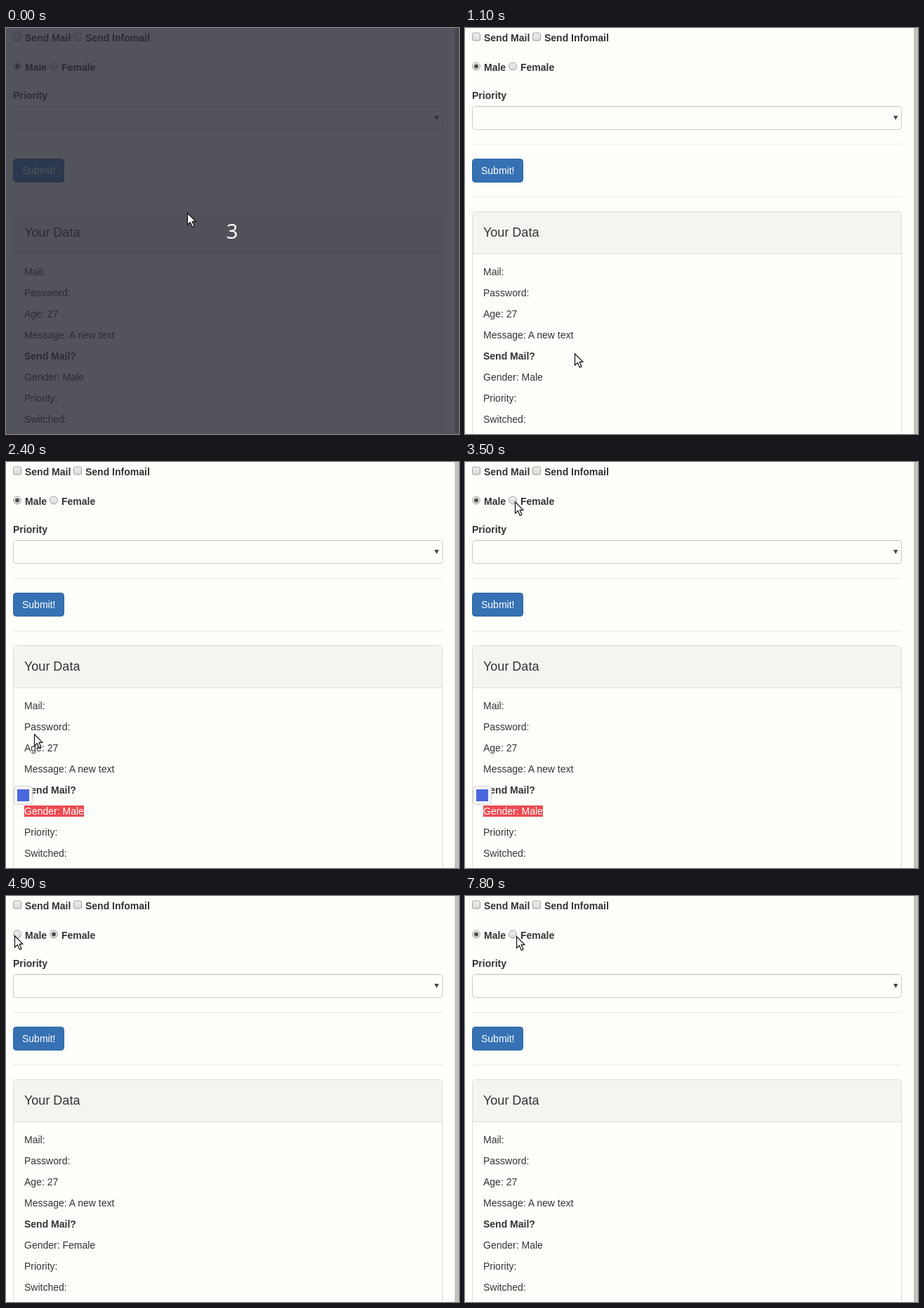
An HTML page that plays this animation: 645x578 px, repeating every 8 s.

```html
<!DOCTYPE html>
<html lang="en">
<head>
<meta charset="utf-8">
<title>Form demo</title>
<style>
  html, body { margin: 0; width: 100%; height: 100%; overflow: hidden; background: #fefffb; }
  svg { display: block; font: 14px "Liberation Sans", Arial, sans-serif; fill: #333; }
  .bold { font-weight: bold; }
  .line { stroke: #ecece9; }
  .box { fill: url(#knob); stroke: #a3a3a1; }
</style>
</head>
<body>
<svg width="645" height="578" viewBox="0 0 645 578">
  <defs>
    <linearGradient id="knob" x2="0" y2="1">
      <stop stop-color="#f0f0ee"/><stop offset="1" stop-color="#d8d8d6"/>
    </linearGradient>
    <clipPath id="selClip"><rect id="clipRect" y="489" height="16"/></clipPath>
  </defs>

  <rect class="box" x="10.5" y="7" width="11" height="11" rx="2"/>
  <rect class="box" x="96.5" y="7" width="11" height="11" rx="2"/>
  <circle class="box" cx="16" cy="54.5" r="5.5"/>
  <circle class="box" cx="68" cy="54.5" r="5.5"/>
  <circle id="dot" cy="54.5" r="3" fill="#505050"/>
  <g class="bold">
    <text x="27" y="19">Send Mail</text>
    <text x="113" y="19">Send Infomail</text>
    <text x="27" y="61">Male</text>
    <text x="79" y="61">Female</text>
    <text x="10" y="101">Priority</text>
  </g>

  <rect x="10.5" y="111.5" width="611" height="33" rx="4" fill="#fefffb" stroke="#c9c9c6"/>
  <path d="M12 112.5H620" stroke="#ecece9"/>
  <path d="M610 125h6.4l-3.2 6z" fill="#444"/>
  <path class="line" d="M10 165.5H622M10 240.5H622"/>
  <rect x="10.5" y="186.5" width="72" height="33" rx="4" fill="#3671b3" stroke="#2e66a2"/>
  <text x="23" y="208" fill="#fff">Submit!</text>

  <rect x="10.5" y="261.5" width="611" height="340" rx="4" fill="#fefffb" stroke="#dcdcd9"/>
  <path d="M11 321V265q0-3 3-3H618q3 0 3 3V321z" fill="#f4f4f1"/>
  <path d="M11 321.5H621" stroke="#dcdcd9"/>
  <text x="26" y="297" font-size="18">Your Data</text>
  <g id="rows"></g>

  <g id="selection">
    <rect id="selRect" y="489" height="16" fill="#ec4a52"/>
    <text x="26" y="502" fill="#fff" clip-path="url(#selClip)">Gender: Male</text>
  </g>
  <g id="popup">
    <rect x="11.5" y="461.5" width="26" height="26" rx="4" fill="#f5f5f3" stroke="#d2d2d0"/>
    <rect x="16" y="466" width="17" height="17" fill="#4a67e0"/>
  </g>
  <rect x="639" width="6" height="578" fill="#c0c0bd"/>

  <g id="countdown">
    <rect width="645" height="578" fill="#282a34" fill-opacity=".8"/>
    <path d="M0 577.5H645" stroke="#6b4652"/>
    <text x="322" y="300" text-anchor="middle" fill="#fff"
      style="font: 29px 'Noto Sans', 'Open Sans', sans-serif">3</text>
  </g>
  <path id="arrow" d="M.5 .8V17.2L4.3 13.6L7.3 20.2L10 19L7.1 12.6L11.8 12.2Z" fill="#fff" stroke="#111" stroke-width="1.2"/>
  <g id="beam" fill="none">
    <path d="M-3-7H3M0-7V7M-3 7H3" stroke="#fff" stroke-width="4"/>
    <path d="M-3-7H3M0-7V7M-3 7H3" stroke="#111" stroke-width="1.6"/>
  </g>
</svg>
<script>
const LOOP = 8000, STEP = 100;
const $ = id => document.getElementById(id);
const show = (id, on) => $(id).style.display = on ? "" : "none";
const place = (id, x, y) => $(id).setAttribute("transform", `translate(${x} ${y})`);

const lines = ["Mail:", "Password:", "Age: 27", "Message: A new text",
  "Send Mail?", "Gender: Male", "Priority:", "Switched:"];
const rows = lines.map((line, i) => {
  const row = document.createElementNS("http://www.w3.org/2000/svg", "text");
  row.setAttribute("x", 26);
  row.setAttribute("y", 352 + 30 * i);
  if (i === 4) row.setAttribute("class", "bold");
  row.textContent = line;
  $("rows").append(row);
  return row;
});

// Pointer moves: start, end, target x, target y
const moves = [
  [500, 800, 186, 426], [900, 1300, 126, 499], [1400, 1600, 108, 497],
  [1600, 1700, 74, 496], [1700, 2100, 24, 497], [2100, 2200, 23, 498],
  [2300, 2700, 90, 53], [2900, 3000, 82, 54], [3100, 3200, 75, 55],
  [3400, 3500, 71, 56], [4500, 4900, 12, 56], [6400, 6500, 12, 54],
  [7300, 7600, 69, 58], [7700, 7800, 73, 57]
];

function pointer(t) {
  let x = 258, y = 263;
  for (const [start, end, tx, ty] of moves) {
    const k = Math.min(1, Math.max(0, (t - start) / (end - start)));
    x += (tx - x) * k;
    y += (ty - y) * k;
  }
  return [Math.round(x), Math.round(y)];
}

function draw(t) {
  const [x, y] = pointer(t);
  const female = t >= 3800 && t < 7000;
  const dragging = t >= 1600 && t < 2400;
  const left = t < 2100 ? Math.max(26, x + 2.5) : 26;

  show("countdown", t < 500);
  show("selection", t >= 1600 && t < 3700);
  show("popup", t >= 2300 && t < 3700);
  show("arrow", !dragging);
  show("beam", dragging);
  place("arrow", x, y);
  place("beam", x, y);
  for (const id of ["selRect", "clipRect"]) {
    $(id).setAttribute("x", left);
    $(id).setAttribute("width", Math.max(0, 111 - left));
  }
  $("dot").setAttribute("cx", female ? 68 : 16);
  rows[5].textContent = "Gender: " + (female ? "Female" : "Male");
}

function tick() {
  draw(Math.floor(performance.now() % LOOP / STEP) * STEP);
  requestAnimationFrame(tick);
}
tick();
</script>
</body>
</html>
```
